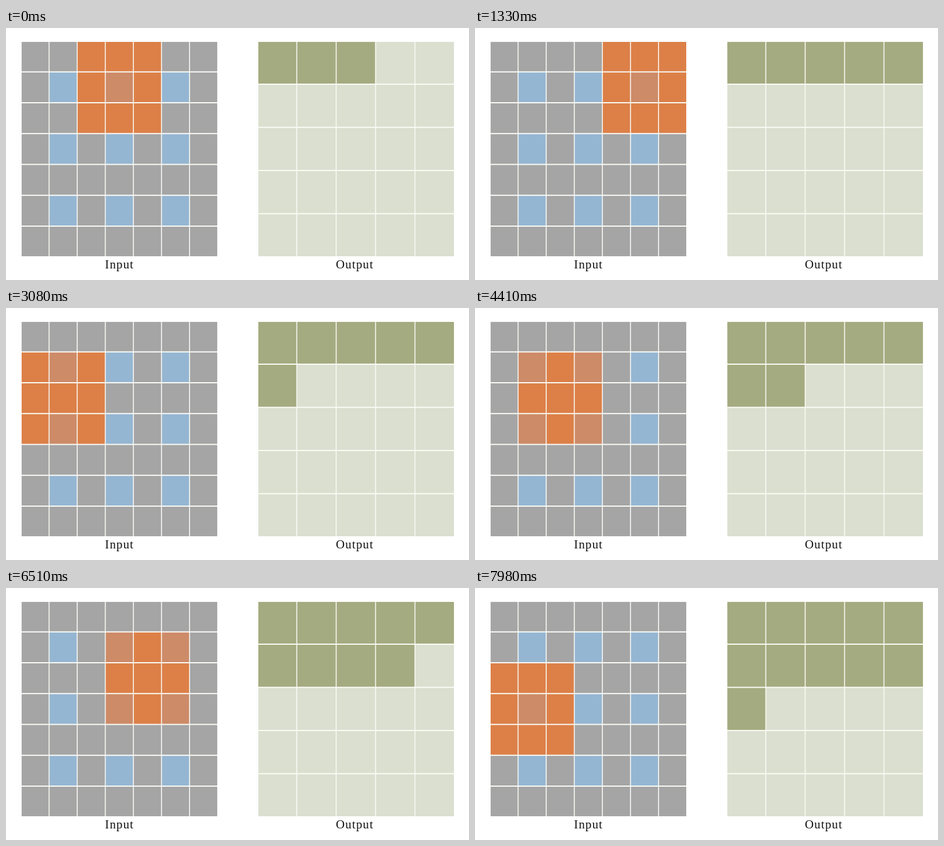
These frames come from a looping animation (800x435 px, 8 s). An HTML page:

```html
<!DOCTYPE html>
<html lang="en">
<head>
<meta charset="utf-8">
<title>Convolution over a padded input</title>
<style>
  html, body { margin: 0; width: 100%; height: 100%; overflow: hidden; background: #fff; }
  svg { display: block; width: 800px; height: 435px; }
  text { font: 21px "Liberation Serif", "Times New Roman", serif; letter-spacing: 1.15px; fill: #111; }
</style>
</head>
<body>
<svg id="stage" viewBox="0 0 800 435"></svg>
<script>
  const LOOP = 8000, FIRST_STEP = 280, STEP = 1050, START = 2;
  const COLOR = {
    gap: '#a5a5a5', value: '#95b6d2',
    kernel: '#dc8048', kernelValue: '#cd8b68',
    done: '#a5ab80', todo: '#dbdfcf', line: '#fbfbf6'
  };
  const stage = document.getElementById('stage');

  function add(tag, attrs) {
    const node = document.createElementNS('http://www.w3.org/2000/svg', tag);
    for (const key in attrs) node.setAttribute(key, attrs[key]);
    return stage.appendChild(node);
  }

  // Solid cells with thin separators on top; returns the cells row by row.
  function makeGrid(count, left, right, pitchX, originX, pitchY, originY) {
    const top = 24, bottom = 394, cells = [];
    const edge = (i, origin, pitch, low, high) =>
      Math.min(high, Math.max(low, origin + i * pitch));
    for (let row = 0; row < count; row++) {
      for (let col = 0; col < count; col++) {
        const x = edge(col, originX, pitchX, left, right);
        const y = edge(row, originY, pitchY, top, bottom);
        cells.push(add('rect', {
          x, y,
          width: edge(col + 1, originX, pitchX, left, right) - x,
          height: edge(row + 1, originY, pitchY, top, bottom) - y,
          'shape-rendering': 'crispEdges'
        }));
      }
    }
    for (let i = 1; i < count; i++) {
      const x = originX + i * pitchX, y = originY + i * pitchY;
      add('path', { d: `M${x} ${top}V${bottom}`, stroke: COLOR.line, 'stroke-width': 1.6 });
      add('path', { d: `M${left} ${y}H${right}`, stroke: COLOR.line, 'stroke-width': 2 });
    }
    return cells;
  }

  const input = makeGrid(7, 27, 365, 48.55, 25.9, 53.25, 22.5);
  const output = makeGrid(5, 435.5, 774, 68.05, 434.4, 74.55, 22.4);
  add('text', { x: 171, y: 415 }).textContent = 'Input';
  add('text', { x: 570, y: 415 }).textContent = 'Output';

  function paint(step) {
    const kernelRow = Math.floor(step / 5), kernelCol = step % 5;
    input.forEach((cell, i) => {
      const row = Math.floor(i / 7), col = i % 7;
      const hasValue = row % 2 === 1 && col % 2 === 1;
      const covered = row >= kernelRow && row < kernelRow + 3 &&
                      col >= kernelCol && col < kernelCol + 3;
      const name = covered ? (hasValue ? 'kernelValue' : 'kernel') : (hasValue ? 'value' : 'gap');
      cell.setAttribute('fill', COLOR[name]);
    });
    output.forEach((cell, i) => cell.setAttribute('fill', i <= step ? COLOR.done : COLOR.todo));
  }

  let shown = -1;
  const begin = performance.now();
  function tick(now) {
    const time = Math.max(0, now - begin) % LOOP;
    const step = START + Math.floor((time - FIRST_STEP) / STEP) + 1;
    if (step !== shown) paint(shown = step);
    requestAnimationFrame(tick);
  }
  tick(begin);
</script>
</body>
</html>
```
